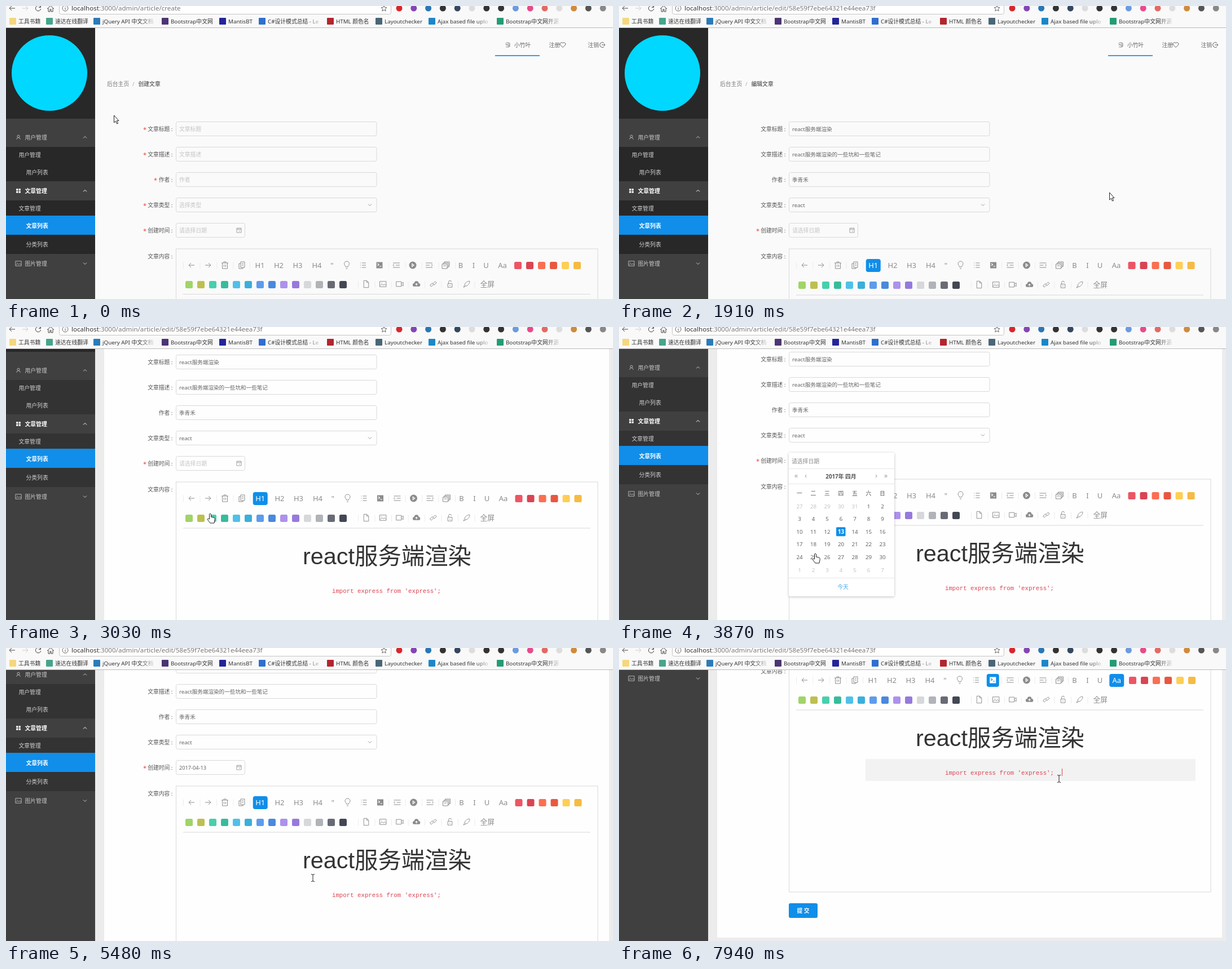
These frames come from a looping animation (1076x520 px, 8000 ms). An HTML page:

```html
<!DOCTYPE html>
<html lang="zh">
<head>
<meta charset="utf-8">
<style>
html, body { margin: 0; width: 100%; height: 100%; overflow: hidden; background: #fafafa; }
svg { display: block; width: 1076px; height: 520px; font: 9.8px "Noto Sans", "Noto Sans CJK SC", "Noto Sans CJK", sans-serif; }
text { white-space: pre; }
</style>
</head>
<body>
<svg id="stage" viewBox="0 0 1076 520"></svg>
<script>
const LOOP = 8000;
const BLUE = '#108ee9', GRAY = '#8c8c8c', LINE = '#d9d9d9';
const AUTHOR = '季青禾', LOGIN = 'jqh', USER = '小竹叶';

// Screen refreshes: start, gap, count
const REFRESH = [[0, 0, 1], [120, 130, 8], [1180, 150, 2], [1490, 138, 6], [2460, 135, 2], [2730, 150, 3],
  [3180, 140, 3], [3600, 135, 3], [3990, 137.5, 5], [4690, 158, 6], [5640, 0, 1], [5780, 143, 7],
  [6910, 125, 5], [7690, 250, 2]];
const STEPS = REFRESH.flatMap(([start, gap, n]) => Array.from({ length: n }, (_, i) => start + gap * i));

// Time, pointer x, pointer y, scroll, pointer shape
const PATH = [
  [0, 191, 194, 0, 'arrow'], [1030, 4, 3, 0, 'arrow'], [1330, 872, 313, 0, 'arrow'], [1490, 869, 331, 0, 'hand'],
  [1766, 869, 331, 0, 'arrow'], [2180, 869, 331, 0, 'arrow'], [2730, 633, 193, 0, 'arrow'],
  [3030, 362, 331, 156, 'hand'], [3180, 372, 296, 161, 'hand'], [3460, 385, 236, 161, 'hand'],
  [3600, 385, 236, 161, 'hand'], [3870, 348, 402, 161, 'hand'], [4402, 397, 459, 161, 'hand'],
  [4540, 397, 461, 161, 'beam'], [5322, 528, 418, 161, 'beam'], [5480, 544, 408, 186, 'beam'],
  [5640, 632, 354, 403, 'beam'], [6640, 858, 231, 403, 'beam'], [6910, 829, 224, 403, 'beam'],
  [7410, 829, 224, 403, 'beam'], [7940, 780, 232, 403, 'beam']];

const POINTERS = {
  arrow: ['M.5 0V13L3.4 10.3L5.5 15L7.6 14.2L5.4 9.6H9Z', '#fff'],
  hand: ['M-1.5 9V1.2Q0-1 1.5 1.2V6L7 7.2Q8.5 8 8.2 10.5L7 17H0L-5 10.5Q-4.5 8-1.5 10Z', '#fff'],
  beam: ['M-3-6.5Q0-6.5 0-5Q0-6.5 3-6.5M0-5V5M-3 6.5Q0 6.5 0 5Q0 6.5 3 6.5', 'none'],
};

// Outline, or solid shape with a cut-out stroke
const ICONS = {
  back: ['M5 0H-5M-1-4L-5 0L-1 4'],
  forward: ['M-5 0H5M1-4L5 0L1 4'],
  trash: ['M-6-4H6M-2-4V-6H2V-4M-4.5-4V6H4.5V-4M-1.5-1V3M1.5-1V3'],
  copy: ['M-2-6H5V4H-2ZM-2-3H-5V6H2V4M0-3H3M0 0H3'],
  bulb: ['M-2 3C-2 1-4.5 0-4.5-2.5A4.5 4.5 0 0 1 4.5-2.5C4.5 0 2 1 2 3ZM-1.5 6H1.5'],
  list: ['M-5-4H-4M-5 0H-4M-5 4H-4M-2-4H5M-2 0H5M-2 4H5'],
  code: ['M-5.5-5.5H5.5V5.5H-5.5Z', 'M-3.5-3L-1-1L-3.5 1M0 2H3.5'],
  outdent: ['M-6-4H6M-1 0H6M-6 4H6M-4-2L-6 0L-4 2'],
  play: ['M-6.5 0A6.5 6.5 0 0 1 6.5 0A6.5 6.5 0 0 1-6.5 0Z', 'M-1.2-2.5L2.2 0L-1.2 2.5Z'],
  indent: ['M-6-4H6M-6 0H1M-6 4H6M4-2L6 0L4 2'],
  stack: ['M-6-2H3V6H-6ZM-4-2V-4H5V4H3M-2-4V-6H7V2H5M-4 1H1'],
  file: ['M-4.5-6.5H1L4.5-3V6.5H-4.5ZM1-6.5V-3H4.5'],
  picture: ['M-6-5H6V5H-6ZM-5 3L-2 0L1 2L3 0L6 3M-3-2H-2'],
  video: ['M-6.5-4.5H3V4.5H-6.5ZM3-1L6.5-3.5V3.5L3 1'],
  cloud: ['M-4 4.5A3 3 0 0 1-4-1.5A4 4 0 0 1 4-1.5A3 3 0 0 1 4 4.5Z', 'M0 3V-1M-2 1L0-1L2 1'],
  link: ['M-1 2L-3 4.5A2.3 2.3 0 0 1-5.5 1.5L-2-1.5A2.3 2.3 0 0 1 1 0M1-2L3-4.5A2.3 2.3 0 0 1 5.5-1.5L2 1.5A2.3 2.3 0 0 1-1 0'],
  lock: ['M-4-1H4V6H-4ZM-2.5-1V-4A2.5 2.5 0 0 1 2.5-4M0 1.5V3.5'],
  rocket: ['M5.5-5.5C1-5.5-2-3-4 1L-1 4C3 2 5.5-1 5.5-5.5ZM-4 2L-6 6L-2 4'],
  down: ['M-3-1.5L0 1.5L3-1.5'],
  up: ['M-3 1.5L0-1.5L3 1.5'],
  date: ['M-4.5-4H4.5V4.5H-4.5ZM-4.5-1.5H4.5M-2-5V-3M2-5V-3M0 1.5H2'],
  heart: ['M0 4.5L-4.5 0A2.5 2.5 0 0 1 0-3A2.5 2.5 0 0 1 4.5 0Z'],
  exit: ['M3-3.5A4.5 4.5 0 1 0 3 3.5M-1 0H5M3-2L5 0L3 2'],
  user: ['M-2.5-2A2.5 2.5 0 0 1 2.5-2A2.5 2.5 0 0 1-2.5-2ZM-4 4.5Q-3 .5 0 .5Q3 .5 4 4.5'],
  knot: ['M3-3.5Q-3-5-3-2Q-3 0 0 0Q3 0 3 2Q3 5-3 3.5M-3 0H4M0-3H4V3H0'],
  pencil: ['M-3.5 2.5L2-3.5L3.5-2L-2 4H-3.5ZM-3 5H4'],
  grid: ['M-4.5-4.5H-.7V-.7H-4.5ZM.7-4.5H4.5V-.7H.7ZM-4.5.7H-.7V4.5H-4.5ZM.7.7H4.5V4.5H.7Z', ''],
  plus: ['M-4.5-4.5H4.5V4.5H-4.5Z', 'M-2.5 0H2.5M0-2.5V2.5'],
  reload: ['M4-2.5A4.7 4.7 0 1 0 4.7 1M4.5-5V-1.5H1'],
  home: ['M-6 0L0-5.5L6 0M-4-1V5H-1V1H1V5H4V-1'],
  star: ['M0-5L1.5-1.5L5-1.2L2.3 1.2L3.2 5L0 3L-3.2 5L-2.3 1.2L-5-1.2L-1.5-1.5Z'],
  info: ['M-5 0A5 5 0 0 1 5 0A5 5 0 0 1-5 0ZM0-1V3M0-3V-2'],
};

const TOOLS = [[329, 'back'], [358, 'forward'], [388, 'trash'], [418, 'copy'], [450, 'H1'], [483.5, 'H2'], [517, 'H3'],
  [551, 'H4'], [578, '"'], [604, 'bulb'], [633, 'list'], [662, 'code'], [692, 'outdent'], [721, 'play'], [750, 'indent'],
  [779, 'stack'], [806, 'B'], [829, 'I'], [851, 'U'], [880, 'Aa']];
const INSERTS = ['file', 'picture', 'video', 'cloud', 'link', 'lock', 'rocket'];
const WARM = ['#ed5565', '#da4453', '#fc6e51', '#e9573f', '#ffce54', '#f6bb42'];
const COOL = ['#a0d468', '#bdc04f', '#48cfad', '#37bc9b', '#4fc1e9', '#3bafda', '#5d9cec', '#4a89dc', '#ac92ec',
  '#967adc', '#d6d8da', '#b0b3b8', '#686b74', '#434753'];

// Icon x, icon colour, label, fading right edge
const BOOKMARKS = [[6, '#f6d77c', '工具书籍'], [71, '#45a58c', '速达在线翻译'], [155, '#2b7bb9', 'jQuery API 中文文档', 264],
  [276, '#4b3573', 'Bootstrap中文网'], [378, '#24249a', 'MantisBT'], [448, '#2f6fd0', 'C#设计模式总结 - Le', 559],
  [569, '#b5242c', 'HTML 颜色名'], [655, '#4a6676', 'Layoutchecker'], [749, '#1b87c9', 'Ajax based file uplo', 859],
  [870, '#239c74', 'Bootstrap中文网开源', 982]];
const EXTENSIONS = ['#d9262c', '#8445b5', '#2a77b5', '#333', '#33475f', '#ddd', '#333', '#333', '#6b9be0', '#e84a8a',
  '#e36a62', '#ddd', '#d08a3c', '#555', '#888'];

const rect = (x, y, w, h, fill, extra = '') => `<rect x="${x}" y="${y}" width="${w}" height="${h}" fill="${fill}" ${extra}/>`;
const frame = (x, y, w, h, rx = 3) => rect(x + .5, y + .5, w - 1, h - 1, 'none', `stroke="${LINE}" rx="${rx}"`);
const text = (x, y, str, fill = '#666', extra = '') => `<text x="${x}" y="${y + 3.6}" fill="${fill}" ${extra}>${str}</text>`;
const middle = (x, y, str, fill, extra = '') => text(x, y, str, fill, 'text-anchor="middle" ' + extra);
const path = (x, y, d, attrs, size = 1) => `<path transform="translate(${x} ${y}) scale(${size})" d="${d}" ${attrs}/>`;
const BOLD = 'font-weight="600"';

function icon(x, y, name, color = GRAY, back = '#fff', size = 1) {
  const [shape, cut] = ICONS[name];
  if (cut === undefined) return path(x, y, shape, `fill="none" stroke="${color}"`, size);
  return path(x, y, shape, `fill="${color}"`, size) + path(x, y, cut, `fill="none" stroke="${back}" stroke-width="1.2"`, size);
}

function chrome(page) {
  const url = { create: '/create', list: '', edit: '/edit/58e59f7ebe64321e44eea73f' }[page];
  let s = rect(0, 0, 1076, 39, '#f9f9f9') + rect(0, 38, 1076, 1, '#b9b9b9');
  s += rect(94.5, -9.5, 588, 24, '#fff', 'stroke="#c4c4c4" rx="3"');
  s += icon(11, 4, 'back', '#444') + icon(34, 4, 'forward', page == 'list' ? '#444' : '#ccc');
  s += icon(57, 4, 'reload', '#444') + icon(79, 5, 'home', '#444') + icon(105, 4, 'info', '#666') + icon(670, 4, 'star', '#666');
  s += `<text x="116" y="8" font-size="11.6" fill="#333">localhost<tspan fill="#777">:3000/admin/article${url}</tspan></text>`;
  EXTENSIONS.forEach((color, i) => s += `<circle cx="${697 + 25.8 * i}" cy="4" r="5.5" fill="${color}"/>`);
  for (const [x, color, label, end] of BOOKMARKS) {
    s += rect(x, 21, 12, 12, color, 'rx="1"') + text(x + 16, 27, label, '#333');
    if (end) s += rect(end - 26, 20, 28, 15, 'url(#fade)');
  }
  return s;
}

function sidebar(scrolled) {
  const dark = scrolled ? '#333' : '#282828';
  const head = (y, name, label, color, arrow, extra) =>
    icon(22, y, name, color, '', .85) + text(33.5, y, label, color, extra) + icon(140, y, arrow, color);
  return rect(0, 39, 158, 900, '#404040') + rect(0, 39, 158, 161, '#282828')
    + '<circle cx="77" cy="119" r="67" fill="#00d8ff"/>'
    + rect(0, 250, 158, 61, dark) + rect(0, 345, 158, 95, dark) + rect(0, 372, 158, 34, BLUE)
    + head(233, 'user', '用户管理', '#c8c8c8', 'up')
    + text(22.5, 264, '用户管理', '#d0d0d0') + text(35.5, 295, '用户列表', '#d0d0d0')
    + head(328, 'grid', '文章管理', '#fff', 'up', BOLD)
    + text(22.5, 359, '文章管理', '#d0d0d0') + text(35.5, 390, '文章列表', '#fff', BOLD) + text(35.5, 423, '分类列表', '#d0d0d0')
    + head(457, 'picture', '图片管理', '#c8c8c8', 'down');
}

function header(title, dx) {
  return `<g transform="translate(${dx} 0)">` + icon(889, 69, 'knot') + text(901, 69, USER) + rect(867, 87.3, 79, 1.7, BLUE)
    + text(962.5, 69, '注册') + icon(987, 69, 'heart', '#666') + text(1031.5, 69, '注销') + icon(1057, 69, 'exit', '#666') + '</g>'
    + text(179, 138, '后台主页', '#777') + text(224, 138, '/', '#aaa') + text(234.5, 138, title, '#333', 'font-weight="500"');
}

function listPage() {
  const columns = [201.5, 259, 428, 498.5, 726, 838];
  const rows = [[AUTHOR, '2017-04-06', 'react', 'react服务端渲染的一些坑和一些笔记', 'react服务端渲染'],
    [LOGIN, '2017-04-11', 'react', 'vue', 'vue']];
  let s = rect(193.5, 205, 74.5, 22.5, BLUE, 'rx="3"') + text(206, 216, '添加文章', '#fff', BOLD) + icon(250, 216, 'plus', '#fff', BLUE);
  ['作者', '创建时间', '文章类型', '文章描述', '文章标题', '操作'].forEach((label, i) =>
    s += text(columns[i], 282, label, '#444', 'font-weight="500"'));
  rows.forEach((row, r) => {
    const y = 332.5 + 60 * r;
    row.forEach((cell, i) => s += text(columns[i], y, i == 1 ? cell + 'T00:00:00.000Z' : cell, i ? '#666' : '#49a9ee',
      `font-size="${i == 1 || i == 2 ? 9.2 : 9.6}"`));
    s += rect(838, y - 12, 60, 23, BLUE, 'rx="3"') + text(851, y, '编辑', '#fff', BOLD) + icon(880, y, 'pencil', '#fff');
    s += rect(916, y - 12, 62.5, 23, '#f08080', 'rx="3"') + icon(934, y, 'trash', '#fff', '', .75);
    s += text(943.5, y, '删 除', '#fff', BOLD) + rect(903, y - 3, 1, 6, LINE) + rect(991, y - 3, 1, 6, LINE);
  });
  return s + frame(982, 437, 23, 22) + frame(1040, 437, 23, 22) + middle(993.5, 447, '‹', '#ccc') + middle(1051.5, 447, '›', '#ccc')
    + rect(1011, 435, 23, 23, BLUE, 'rx="3"') + middle(1022.5, 447, '1', '#fff', BOLD);
}

function toolbar(active) {
  const on = active.length > 0;
  const y1 = 460.5, y2 = on ? 495.5 : 494.5;
  const swatches = (colors, x, y) => colors.map((c, i) => rect(x + 21 * i - 6.5, y - 6.5, 13, 13, c, 'rx="2.5"')).join('');
  const bars = (x, n, y) => Array.from({ length: n }, (_, i) => rect(x + 29.5 * i, y - 6, 1, 12, '#ececec')).join('');
  let s = bars(314, 5, y1) + bars(678, 5, y1) + bars(624, 8, y2), shift = 0;
  for (const [x, name] of TOOLS) {
    const lit = active.includes(name), isIcon = name in ICONS, color = lit ? '#fff' : GRAY;
    if (lit) {
      const w = isIcon ? 22 : 26;
      shift += .75;
      s += rect(x + shift - w / 2, y1 - 11.5, w, 23, BLUE, 'rx="4"');
    }
    s += isIcon ? icon(x + shift, y1 - .5, name, color, lit ? BLUE : '#fff')
      : middle(x + shift, y1 + .5, name, color, 'font-size="13"');
    if (lit) shift += .75;
  }
  s += swatches(WARM, 907.5 + shift, y1) + swatches(COOL, 324.5, y2);
  INSERTS.forEach((name, i) => s += icon(638.5 + 29.7 * i, y2 - 1, name, GRAY, '#fff', .95));
  return s + text(840.5, y2 - .5, '全屏', GRAY, 'font-size="12.8"') + rect(314, on ? 512.5 : 511, 722, 1, LINE);
}

function calendar() {
  const colX = i => 320 + 24.5 * i;
  let s = rect(301, 223, 187, 255, '#fff', 'rx="3" filter="url(#shadow)"') + text(306, 238, '请选择日期', '#888');
  for (const y of [251, 278, 445]) s += rect(301, y, 187, 1, '#e6e6e6');
  s += middle(393.5, 265, '2017年 四月', '#555', BOLD);
  [[314, '«'], [331, '‹'], [456, '›'], [473, '»']].forEach(([x, c]) => s += middle(x, 264.5, c, '#999', 'font-size="12"'));
  [...'一二三四五六日'].forEach((d, i) => s += middle(colX(i), 295, d, '#555'));
  for (let i = 0; i < 42; i++) {
    const day = i - 4, x = colX(i % 7), y = 318 + 22.6 * Math.floor(i / 7);
    const inside = day > 0 && day < 31, today = day == 13;
    if (today) s += rect(x - 8.5, y - 8, 16.5, 16, BLUE, 'rx="1.5"');
    s += middle(x, y, day < 1 ? day + 31 : inside ? day : day - 30, today ? '#fff' : inside ? '#666' : '#c4c4c4', today ? BOLD : '');
  }
  return `<g transform="translate(0 161)">${s}${middle(397, 461, '今天', '#49a9ee')}</g>`;
}

function formPage(editing, t) {
  const fields = [['文章标题', 'react服务端渲染'], ['文章描述', 'react服务端渲染的一些坑和一些笔记'], ['作者', AUTHOR], ['文章类型', 'react']];
  const focused = t >= 6910;
  const label = (y, name, star) => text(295.5, y, name + ' :', '#555', 'text-anchor="end"')
    + (star ? text(name.length > 2 ? 243 : 262, y + 1, '*', '#f04134', 'font-size="11"') : '');
  let s = '';
  fields.forEach(([name, value], i) => {
    const y = 218 + 45.1 * i;
    s += label(y, name, !editing) + frame(301, Math.round(y - 13), 356.5, 26);
    s += editing ? text(307, y, value, '#666', 'font-size="9.6"') : text(307, y, i == 3 ? '选择类型' : name, '#c4c4c4');
  });
  const dated = t >= 4540;
  s += icon(645, 353, 'down', '#999') + label(398.5, '创建时间', true) + frame(301, 385, 123, 26) + icon(413, 398, 'date', '#999', '', .9);
  s += text(307, 398.5, dated ? '2017-04-13' : '请选择日期', dated ? '#666' : '#c4c4c4', dated ? 'font-size="9.2"' : '');
  s += label(444, '文章内容') + frame(301, 430.5, 748.5, 406, 0);
  s += toolbar(!editing ? [] : focused ? ['code', 'Aa'] : ['H1']);
  if (editing) {
    if (focused) s += rect(437, 600, 585, 39, '#f2f2f2');
    s += `<text x="675.5" y="577" font-size="41.4" fill="#333" text-anchor="middle" style="font-family:'Liberation Sans','Noto Sans CJK SC','Noto Sans CJK',sans-serif">react服务端渲染</text>`;
    s += `<text x="578" y="628" font-size="10.72" fill="#dc4453" style="font-family:'Liberation Mono',monospace">import express from 'express';</text>`;
    if (focused && (t < 7410 || t >= 7940)) s += rect(785, 617, 1, 13, '#dc4453');
  }
  s += rect(301, 856, 51, 26, BLUE, 'rx="3"') + middle(326.5, 869, '提 交', '#fff', BOLD);
  return s + (t >= 3600 && t < 4540 ? calendar() : '');
}

function pose(t) {
  const i = PATH.findLastIndex(key => key[0] <= t), a = PATH[i], b = PATH[i + 1] || a;
  const k = b === a ? 0 : (t - a[0]) / (b[0] - a[0]);
  const [x, y, scroll] = [1, 2, 3].map(j => Math.round(a[j] + (b[j] - a[j]) * k));
  return { x, y, scroll, shape: a[4] };
}

function render(t) {
  const { x, y, scroll, shape } = pose(t);
  const page = t < 1180 ? 'create' : t < 1766 ? 'list' : 'edit', isList = page == 'list';
  const title = { create: '创建文章', list: '文章列表', edit: '编辑文章' }[page];
  const back = scroll ? rect(158, 0, 918, 960, '#ececec') + rect(174, 39, 895, 878, '#fefefe')
    : rect(158, 0, 918, 960, isList ? '#f8f8f8' : '#fafafa');
  const [outline, fill] = POINTERS[shape];
  return `<defs><linearGradient id="fade"><stop stop-color="#f9f9f9" stop-opacity="0"/><stop offset="1" stop-color="#f9f9f9"/></linearGradient>
    <filter id="shadow"><feDropShadow dx="0" dy="1" stdDeviation="2" flood-opacity=".25"/></filter></defs>
    <g transform="translate(0 ${-scroll})">${back}${sidebar(scroll > 0)}${header(title, isList ? 14 : 0)}${isList ? listPage() : formPage(page == 'edit', t)}</g>`
    + chrome(page) + path(x, y, outline, `fill="${fill}" stroke="#222" stroke-linejoin="round"`);
}

const stage = document.getElementById('stage');
const began = performance.now();
let shown = -1;
function tick() {
  const now = (performance.now() - began) % LOOP;
  const step = STEPS.findLast(s => s <= now);
  if (step !== shown) stage.innerHTML = render(shown = step);
  requestAnimationFrame(tick);
}
tick();
</script>
</body>
</html>
```
